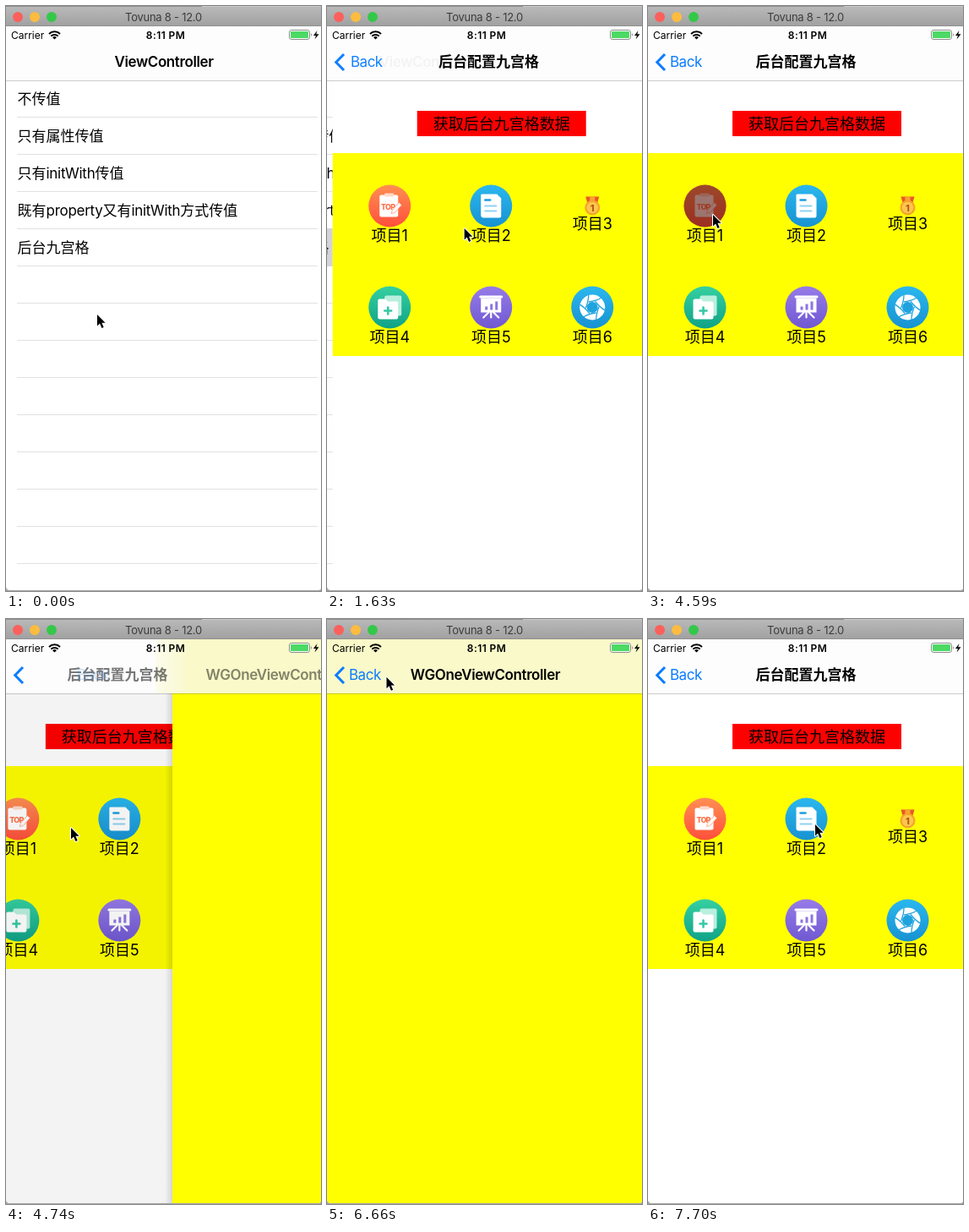
Animation of 373 by 692 pixels, one loop 7.99 s. Source, as an HTML page:

```html
<!DOCTYPE html>
<html lang="zh">
<head>
<meta charset="utf-8">
<style>
html, body { margin: 0; width: 100%; height: 100%; overflow: hidden; background: #a8a8a8; }
svg { display: block; width: 373px; height: 692px; }
text { font-family: Inter, "Noto Sans CJK SC", "Noto Sans CJK JP", sans-serif; font-size: 17px; fill: #000; white-space: pre; }
.latin { letter-spacing: -.28px; }
.mid { text-anchor: middle; }
.title { font-weight: 600; }
.title .latin { letter-spacing: -.4px; }
.blue .latin { letter-spacing: -.5px; }
.label { font-size: 18px; }
.blue { fill: #0a7cff; }
.line { fill: none; stroke-linecap: round; stroke-linejoin: round; }
</style>
</head>
<body>
<svg id="stage" viewBox="0 0 373 692"></svg>
<script>
const stage = document.getElementById('stage');
const WIDTH = 375, STEP = 148, LOOP = 7990;

const rect = (x, y, w, h, fill, extra = '') =>
  `<rect x="${x}" y="${y}" width="${w}" height="${h}" fill="${fill}" ${extra}/>`;
const circle = (x, y, r, fill, extra = '') =>
  `<circle cx="${x}" cy="${y}" r="${r}" fill="${fill}" ${extra}/>`;
const path = (d, fill, extra = '') => `<path d="${d}" fill="${fill}" ${extra}/>`;
const line = (d, color, width) =>
  `<path class="line" d="${d}" stroke="${color}" stroke-width="${width}"/>`;
const text = (x, y, str, cls = '', extra = '') =>
  `<text x="${x}" y="${y}" class="${cls}" ${extra}>` +
  str.replace(/[A-Za-z]+/g, '<tspan class="latin">$&</tspan>') + '</text>';
const group = (id, content, extra = '') => `<g id="${id}" ${extra}>${content}</g>`;
const gradient = (id, stops, horizontal) =>
  `<linearGradient id="${id}" x2="${horizontal ? 1 : 0}" y2="${horizontal ? 0 : 1}">` +
  stops.map(([at, color, alpha = 1]) =>
    `<stop offset="${at}" stop-color="${color}" stop-opacity="${alpha}"/>`).join('') +
  '</linearGradient>';

const defs = '<defs>' +
  gradient('bar', [[0, '#bababa'], [1, '#a0a0a0']]) +
  gradient('orange', [[0, '#ff8f52'], [1, '#ff4f3c']]) +
  gradient('sky', [[0, '#2bb7ee'], [1, '#1792d2']]) +
  gradient('green', [[0, '#35d0a0'], [1, '#10a287']]) +
  gradient('purple', [[0, '#967be8'], [1, '#7058d2']]) +
  gradient('shade', [[0, '#000', 0], [1, '#000', .24]], true) +
  gradient('tint', [[0, '#f9f9c9', .3], [.7, '#f9f9c9'], [1, '#f9f9c9']], true) +
  '<clipPath id="window"><rect y="-6" width="374" height="697" rx="4.5"/></clipPath>' +
  '<clipPath id="backArea"><rect x="13" y="44" width="360" height="44"/></clipPath></defs>';

// Icons are drawn around their centre.
const disc = color => circle(0, 0, 25, `url(#${color})`);
const icons = [
  disc('orange') + rect(-12, -13, 22, 26, '#fff', 'rx="2"') + rect(-6, -15, 11, 4, '#ffd9c8', 'rx="1"') +
    '<text class="mid" x="-2" y="4" style="font-size:9px;font-weight:800;fill:#ff7048;letter-spacing:-.8px">TOP</text>' +
    path('M3 5L11 -4L14 -1L6 8L2 9Z', '#fff', 'stroke="#ff9a78" stroke-width=".8"'),
  disc('sky') + path('M-11 -14H7L12 -9V12Q12 14 10 14H-9Q-12 14 -12 11V-13Z', '#fff') +
    line('M-7 -7H-1', '#1b9fdf', 2.4) + line('M-7 0H6M-7 6H6', '#8fd2f2', 2.2),
  path('M-8 -11H8L6 -4H-6Z', '#e9572b') + rect(-3, -11, 6, 7, '#f7a62c') +
    circle(0, 2, 9, '#f5a32b') + circle(0, 2, 6.8, '#ffc64d') +
    '<text class="mid" y="6" style="font-size:11px;font-weight:800;fill:#b5561a">1</text>',
  disc('green') + rect(-6, -14, 20, 24, '#b9efdd', 'rx="2"') +
    path('M-14 -8Q-14 -10 -12 -10H-5L-2 -7H8Q10 -7 10 -5V12Q10 14 8 14H-12Q-14 14 -14 12Z', '#fff') +
    line('M-6 4H2M-2 0V8', '#35c9a4', 2.6),
  disc('purple') + rect(-14, -14, 28, 3, '#fff', 'rx="1.5"') + rect(-12, -11, 24, 17, '#fff') +
    line('M0 6V12M-3 6L-9 12M3 6L9 12', '#fff', 2.2) +
    rect(-7, -1, 3, 4, '#8d74e2') + rect(-1, -4, 3, 7, '#8d74e2') + rect(5, -7, 3, 10, '#8d74e2'),
  disc('sky') + circle(0, 0, 15, '#fff') + circle(0, 0, 6.5, '#1ea3df') +
    [0, 60, 120, 180, 240, 300].map(a =>
      `<path transform="rotate(${a})" class="line" d="M-4 -6.5Q5 -8 10 -11" stroke="#1ea3df" stroke-width="1.3"/>`).join('')
];

const rows = ['不传值', '只有属性传值', '只有initWith传值', '既有property又有initWith方式传值', '后台九宫格'];
const separators = Array.from({ length: 13 }, (_, i) => rect(13, 131 + 44 * i, 356, 1, '#e1e1e4')).join('');
const listPage = rect(0, 24, WIDTH, 668, '#fff') + separators +
  rect(0, 263, WIDTH, 45, '#d4d4d4', 'id="selected"') +
  rows.map((row, i) => text(13.5, 116 + 44 * i, row)).join('');

const items = icons.map((icon, i) => {
  const x = 67.5 + 120 * (i % 3), y = 236.5 + 120 * Math.floor(i / 3);
  return `<g transform="translate(${x} ${y})">${icon}${i ? '' : circle(0, 0, 25, '#5a1a10', 'id="pressed"')}</g>` +
    text(x, y + (i === 2 ? 27.5 : 41.5), '项目' + (i + 1), 'mid label');
}).join('');
const gridPage = rect(-9, 88, 9, 604, 'url(#shade)', 'id="gridShade"') +
  rect(0, 24, 500, 668, '#fff') + rect(0, 174, 500, 240, '#ff0') + rect(100, 124, 200, 30, '#f00') +
  text(200, 145.8, '获取后台九宫格数据', 'mid label') + items +
  rect(0, 24, 500, 668, '#000', 'id="gridDim"');
const lastPage = rect(-9, 88, 9, 604, 'url(#shade)', 'id="lastShade"') + rect(0, 24, WIDTH, 668, '#ff0');

const navBar = rect(0, 24, 373, 64, '#fdfdfd') +
  group('navTint', rect(-20, 24, 60, 64, 'url(#tint)') + rect(40, 24, 400, 64, '#f9f9c9')) +
  rect(0, 88, 373, 1, '#000', 'opacity=".2"') +
  text(0, 72, 'ViewController', 'mid title', 'id="title1"') +
  text(0, 72, '后台配置九宫格', 'mid title', 'id="title2"') +
  text(0, 72, 'WGOneViewController', 'mid title', 'id="title3"') +
  group('backs', text(0, 72, 'Back', 'blue', 'id="back1"') + text(0, 72, 'Back', 'blue', 'id="back2"'),
    'clip-path="url(#backArea)"') +
  group('chevron', '<path d="M20 57L10.7 66.5L20 76" fill="none" stroke="#0a7cff" stroke-width="3"/>');

const statusBar = '<text x="6" y="38.5" style="font-size:12px">Carrier</text>' +
  '<text class="mid" x="189" y="38.5" style="font-size:12px;font-weight:600;letter-spacing:.4px">8:11 PM</text>' +
  '<path d="M51 33a9.2 9.2 0 0 1 13 0M53.3 35.6a6 6 0 0 1 8.4 0" fill="none" stroke="#000" stroke-width="2"/>' +
  path('M57.5 39.6l-2.4-2.4a3.4 3.4 0 0 1 4.8 0z', '#000') +
  rect(335.5, 28.5, 24, 11, '#fff', 'rx="2.6" stroke="#8a8a8a"') +
  rect(337, 30, 21, 8, '#4cd964', 'rx="1"') + path('M361 32q2 2 0 4z', '#8a8a8a') +
  path('M368.5 29L364 35H367L365.5 39.5L370.5 33.2H367.3Z', '#000');

const titleBar = rect(0, 0, 373, 24, 'url(#bar)') +
  rect(0, 0, 232, 1, '#8e8e8e') + rect(232, 0, 141, 1, '#c9c9c9') + rect(0, 23, 373, 1, '#909090') +
  circle(14, 13, 6, '#fc605c') + circle(34, 13, 6, '#fdbc40') + circle(54, 13, 6, '#34c84a') +
  '<text class="mid" x="186.5" y="17.8" style="font-size:13px;letter-spacing:-.25px;fill:#3d3d3d">Tovuna 8 - 12.0</text>';

stage.innerHTML = defs + rect(0, 0, 373, 692, '#a8a8a8') +
  `<g clip-path="url(#window)">${group('list', listPage)}${group('grid', gridPage)}${group('last', lastPage)}` +
  `${navBar}${statusBar}${titleBar}</g>` +
  group('cursor', path('M0 0V13.5L3.1 10.6L5.4 16L7.7 15L5.4 9.7H9.6Z', '#000',
    'stroke="#fff" stroke-width="2" stroke-linejoin="round" paint-order="stroke"'));

const parts = Object.fromEntries([...stage.querySelectorAll('[id]')].map(el => [el.id, el]));
const move = (id, x, y = 0) => parts[id].setAttribute('transform', `translate(${x} ${y})`);
const fade = (id, alpha) => parts[id].setAttribute('opacity', alpha);

// Times in steps: push to the grid, push to the last page, pop back.
const PUSH_GRID = 8.762, PUSH_LAST = 31.4, POP_LAST = 47.724;
const cursorPath = [
  [0, 108, 365], [4, 158, 289], [10, 158, 289], [16, 186, 133], [17, 188, 134], [26, 188, 134],
  [30, 77, 247], [32, 77, 247], [35, 207, 76], [42, 207, 74], [46, 25, 67], [47, 25, 67],
  [48, 38, 88], [49, 94, 159], [52, 198, 243], [60, 198, 243]
];

function spring(step, start) {
  const u = 2.664 * (step - start);
  return u <= 0 ? 0 : u > 9 ? 1 : 1 - (1 + u) * Math.exp(-u);
}

function cursorAt(step) {
  const i = cursorPath.findIndex(key => key[0] > step);
  const [t0, x0, y0] = cursorPath[i - 1], [t1, x1, y1] = cursorPath[i];
  const k = (step - t0) / (t1 - t0);
  return [x0 + (x1 - x0) * k, y0 + (y1 - y0) * k];
}

function draw(step) {
  const toGrid = spring(step, PUSH_GRID);
  const toLast = spring(step, PUSH_LAST) - spring(step, POP_LAST);
  const lastX = WIDTH * (1 - toLast);

  move('list', -98 * toGrid);
  move('grid', WIDTH * (1 - toGrid) - 112 * toLast);
  move('last', lastX);
  fade('gridDim', .1 * toLast);
  // Shadows show only while their page is moving in or out.
  fade('gridShade', toGrid > 0 ? 1 - toGrid : 0);
  fade('lastShade', step > POP_LAST ? toLast : toLast > 0 ? 1 - toLast : 0);
  fade('selected', step > PUSH_GRID ? 1 : 0);
  fade('pressed', step === 31 ? .6 : 0);

  move('navTint', toLast === 1 ? -40 : lastX);
  fade('navTint', toLast > 0 ? 1 : 0);
  move('title1', 187 - 68 * toGrid);
  fade('title1', (1 - toGrid) * (1 + toGrid));
  move('title2', 187 + 251 * (1 - toGrid) - 116 * toLast);
  fade('title2', toGrid * (1 - toLast));
  move('title3', 187.5 + 262 * (1 - toLast));
  fade('title3', toLast);
  move('back1', 26 + 110 * (1 - toGrid) - 116 * toLast);
  fade('back1', toGrid ** 2 * (1 - toLast));
  move('back2', 26 + 110 * (1 - toLast));
  fade('back2', toLast ** 2);
  fade('chevron', toGrid);
  move('cursor', ...cursorAt(step));
}

function tick() {
  draw(Math.floor((performance.now() % LOOP + 8) / STEP));
  requestAnimationFrame(tick);
}
tick();
</script>
</body>
</html>
```
